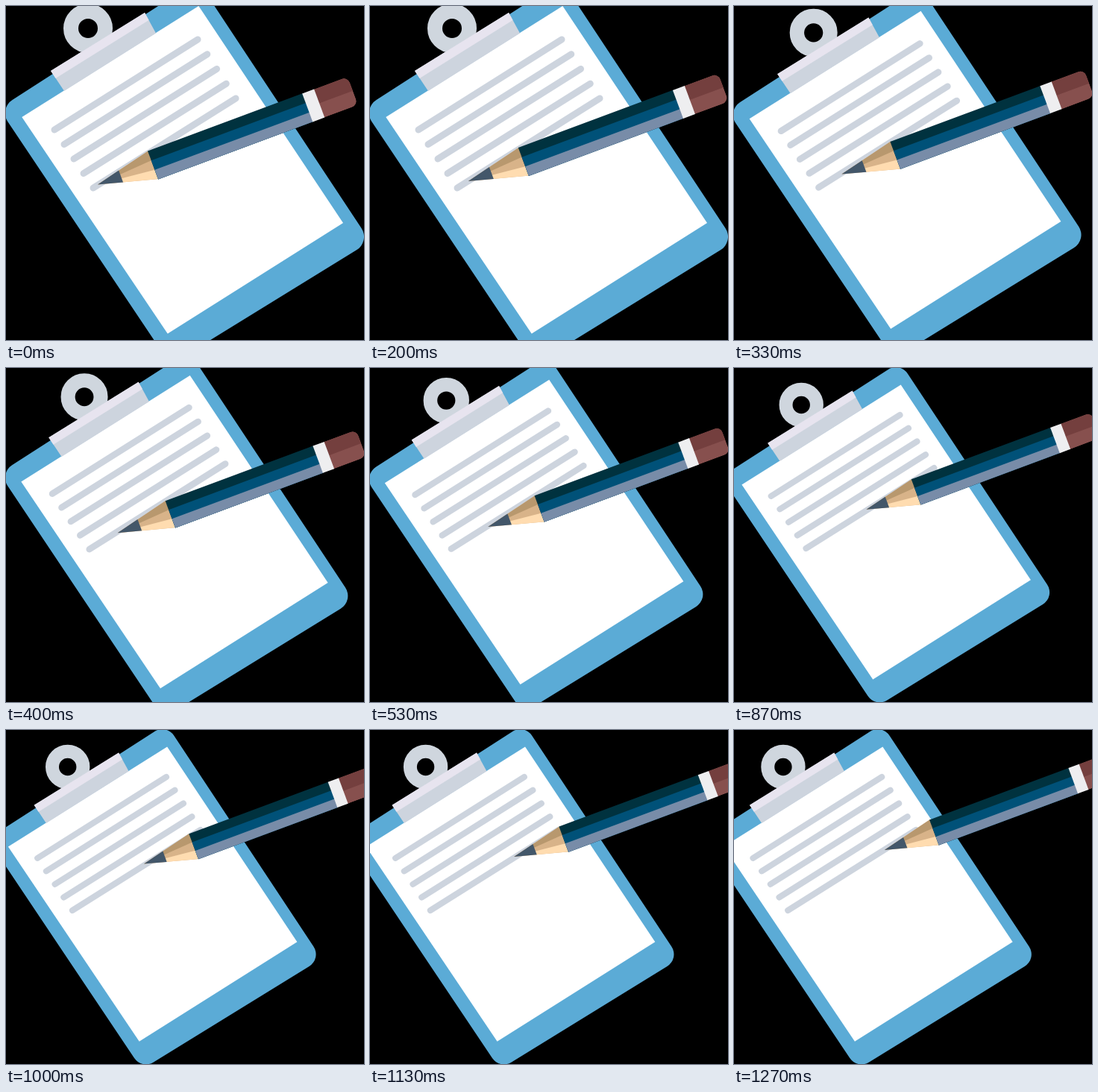
An HTML page with a canvas for the animation above (1340 ms loop, 480 by 448 pixels).

```html
<!DOCTYPE html>
<html lang="en">
<head>
<meta charset="utf-8">
<title>Clipboard and pencil</title>
<style>
html, body { margin: 0; width: 480px; height: 448px; overflow: hidden; background: #000; }
canvas { display: block; }
</style>
</head>
<body>
<canvas id="stage" width="480" height="448"></canvas>
<script>
const W = 480, H = 448, LOOP = 1340, STEPS = 20;
const BOARD_H = 498, PENCIL_RIGHT = 469;
const ctx = document.getElementById('stage').getContext('2d');

// The pencil hesitates, then speeds up along the last line with a slight sway
function travelAt(step) {
  const pause = 10 * Math.exp(-(((step - 2.3) / 2.4) ** 2));
  const dx = 4 + 4.2 * step + 0.15 * step * step - pause;
  return [dx, -0.62 * dx + 2.4 * Math.sin(2 * Math.PI * dx / 139)];
}

function poly(color, ...pts) {
  ctx.fillStyle = color;
  ctx.beginPath();
  pts.forEach(([x, y]) => ctx.lineTo(x, y));
  ctx.fill();
}

function roundPoly(color, r, ...pts) {
  const n = pts.length, [a, b] = [pts[n - 1], pts[0]];
  ctx.fillStyle = color;
  ctx.beginPath();
  ctx.moveTo((a[0] + b[0]) / 2, (a[1] + b[1]) / 2);
  pts.forEach((p, i) => ctx.arcTo(...p, ...pts[(i + 1) % n], r));
  ctx.fill();
}

function rect(color, x, y, w, h) {
  ctx.fillStyle = color;
  ctx.fillRect(x, y, w, h);
}

function drawBoard() {
  ctx.strokeStyle = '#cfd6de';
  ctx.lineWidth = 20;
  ctx.beginPath();
  ctx.arc(110, 30, 23, 0, 2 * Math.PI);
  ctx.stroke();

  roundPoly('#5babd6', 21, [-9.5, 137.5], [257, -34], [488.5, 316], [220.5, 481]);
  poly('#fff', [21.3, 149], [258.3, 0], [452, 291], [216.7, 439.5]);
  poly('#cdd4de', [60, 87], [186, 9], [201, 36.5], [78, 114]);
  poly('#e7e4ef', [60, 87], [186, 9], [191.5, 19], [66.5, 97]);

  ctx.strokeStyle = '#cdd4de';
  ctx.lineWidth = 9;
  ctx.lineCap = 'round';
  ctx.beginPath();
  for (let i = 0; i < 5; i++) {
    ctx.moveTo(65 + 13 * i, 166 + 19.5 * i);
    ctx.lineTo(257 + 12.75 * i, 45 + 19.75 * i);
  }
  ctx.stroke();
}

// Local axes: x along the shaft from its painted end, y across it
function drawPencil() {
  const tip = [-78.5, 18.8], h = 40.5, band = h / 3, lead = 0.42;
  const edge = y => [tip[0] * (1 - lead), tip[1] + (y - tip[1]) * lead];

  poly('#d8b389', tip, [1, 0], [1, h]);
  poly('#b8986e', tip, [1, 0], [1, band]);
  poly('#ffdcb0', tip, [1, band * 2], [1, h]);
  poly('#43576a', tip, edge(0), edge(h));

  ['#00323f', '#005178', '#788ca8'].forEach((color, i) =>
    rect(color, 0, band * i, 222, h - band * i));

  ctx.save();
  ctx.beginPath();
  ctx.roundRect(237, 0, 49, h, [0, 9, 9, 0]);
  ctx.clip();
  rect('#87504e', 237, 0, 49, h);
  rect('#743f3e', 237, 0, 49, h / 2);
  ctx.restore();
  rect('#eeeef0', 221, 0, 17, h);
}

function draw(time) {
  const t = time % LOOP;
  // Steps fall on times rounded to 10 ms
  const step = Math.min(STEPS - 1, Math.floor((t + 4) * 3 / 200));
  const [dx, dy] = travelAt(step);

  // The view covers the stage with the bounds of board and pencil, centred
  const width = Math.max(W, PENCIL_RIGHT + dx);
  const scale = Math.max(W / width, H / BOARD_H);

  ctx.setTransform(1, 0, 0, 1, 0, 0);
  rect('#000', 0, 0, W, H);
  ctx.translate(W / 2, H / 2);
  ctx.scale(scale, scale);
  ctx.translate(-width / 2, -H / 2);
  drawBoard();
  ctx.translate(190 + dx, 194.5 + dy);
  ctx.rotate(-20.4 * Math.PI / 180);
  drawPencil();
}

const start = performance.now();
function tick() {
  draw(performance.now() - start);
  requestAnimationFrame(tick);
}
tick();
</script>
</body>
</html>
```
